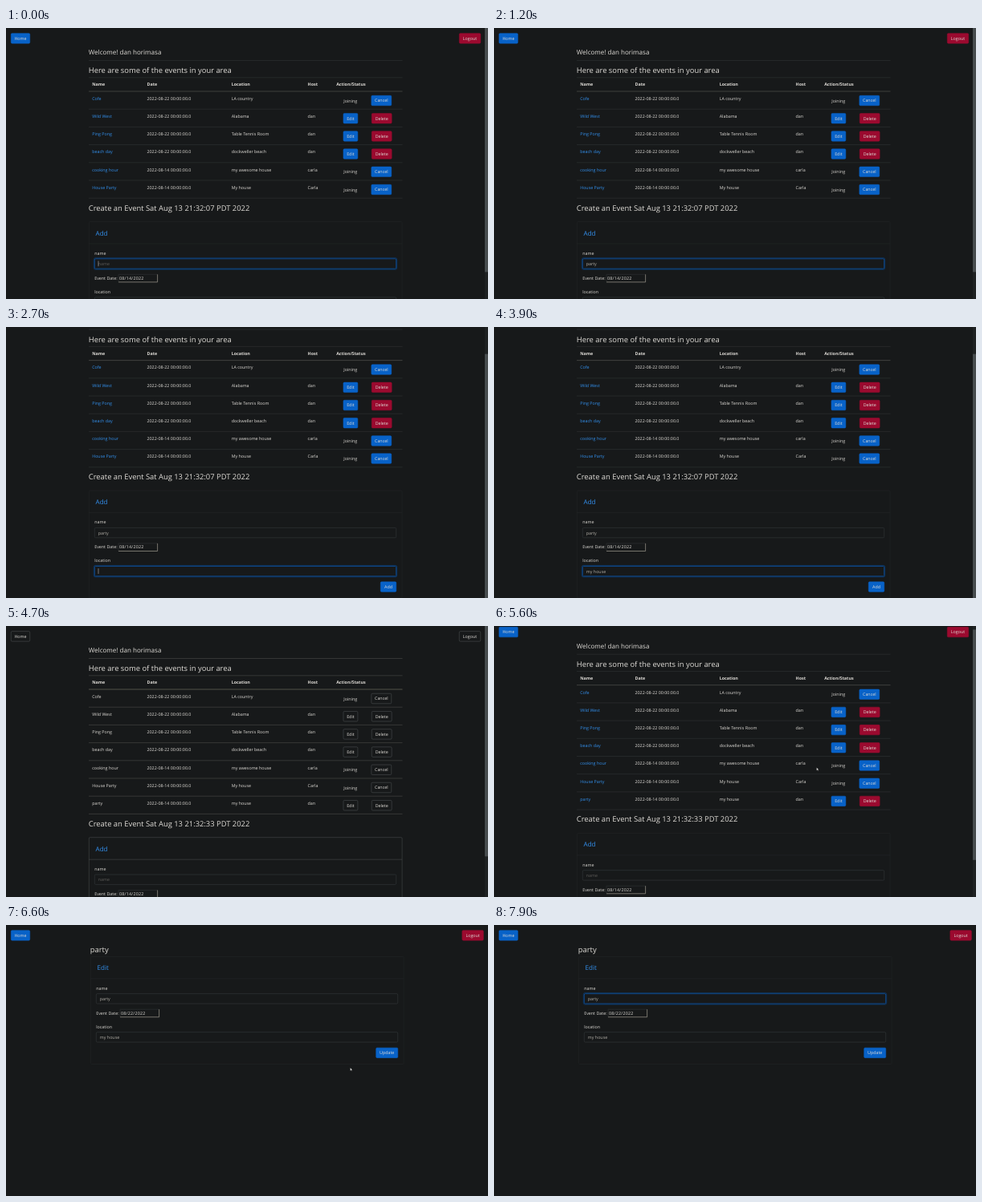
Recreate the animation shown at these times as an HTML page. Size 600x338 px, loop 8000 ms.

```html
<!DOCTYPE html>
<html lang="en">
<head>
<meta charset="utf-8">
<title>Events</title>
<style>
  html, body { margin: 0; width: 100%; height: 100%; overflow: hidden; background: #17191a; }
  svg {
    --raw: 0%;
    --bg: #17191a;
    --ink: #dedbd6;
    display: block; width: 600px; height: 338px; background: var(--bg);
    font: 5.35px "Open Sans", "Noto Sans", sans-serif;
    text-rendering: geometricPrecision;
  }
  text { fill: var(--ink); white-space: pre; }
  .h3 { font-size: 9.4px; font-weight: 500; }
  .h4 { font-size: 8.06px; font-weight: 500; }
  .th { font-weight: 700; }
  .mid { text-anchor: middle; }
  .title { fill: #3391ef; }
  .link { fill: color-mix(in srgb, var(--ink) var(--raw), #3391ef); }
  .value { fill: #b3afa8; }
  .hint { fill: #5d5c59; }
  .date { letter-spacing: .22px; }
  .rule { stroke: color-mix(in srgb, #4a4b48 var(--raw), #2f3335); stroke-width: .6; }
  .rule.head { stroke: color-mix(in srgb, #7b7868 var(--raw), #595a57); }
  .card, .cardline { fill: none; stroke: color-mix(in srgb, #45494b var(--raw), #222628); stroke-width: .6; }
  .input { fill: #17191a; stroke: #34393b; stroke-width: .6; }
  .focus .input { stroke: #0d56a8; stroke-width: .8; }
  .ring { fill: none; stroke: #0b3c73; stroke-width: 1; opacity: 0; }
  .focus .ring { opacity: .75; }
  .caret { stroke: #d5d2cc; stroke-width: .5; }
  .inset { fill: none; stroke: #a09b90; stroke-width: .7; }
  .inset.dim { stroke: #2b2f31; }
  .btn rect.face { stroke-width: .5; }
  .blue .face {
    fill: color-mix(in srgb, var(--bg) var(--raw), #0862c8);
    stroke: color-mix(in srgb, #55595a var(--raw), #0862c8);
  }
  .red .face {
    fill: color-mix(in srgb, var(--bg) var(--raw), #9b0a2f);
    stroke: color-mix(in srgb, #55595a var(--raw), #9b0a2f);
  }
  .btn.hover .face { fill: #0753a9; }
  .track { fill: #1e2122; }
  .thumb { fill: #474c4e; }
</style>
</head>
<body>
<svg id="stage" viewBox="0 0 600 338"></svg>
<script>
const NS = 'http://www.w3.org/2000/svg';
const LOOP = 8000, STEP = 100, VIEW = 338, ROW = 22.2, PAGE = 375.4;
const stage = document.getElementById('stage');

function el(parent, tag, attrs = {}, content = '') {
  const node = document.createElementNS(NS, tag);
  for (const key in attrs) node.setAttribute(key, attrs[key]);
  node.textContent = content;
  return parent.appendChild(node);
}
const group = (parent, cls = '') => el(parent, 'g', { class: cls });
const text = (parent, x, y, str, cls = '') => el(parent, 'text', { x, y, class: cls }, str);
const box = (parent, x, y, width, height, cls, rx = 1.3) =>
  el(parent, 'rect', { x, y, width, height, rx, class: cls });
const line = (parent, x1, y1, x2, y2, cls) => el(parent, 'line', { x1, y1, x2, y2, class: cls });
const show = (node, on) => node.style.display = on ? '' : 'none';
const shift = (node, x, y) => node.setAttribute('transform', `translate(${x} ${y})`);

function button(parent, x, y, w, label, color) {
  const g = group(parent, 'btn ' + color);
  box(g, x - .9, y - .9, w + 1.8, 14.8, 'ring', 2);
  box(g, x + .25, y + .25, w - .5, 12.5, 'face');
  text(g, x + w / 2, y + 8.4, label, 'mid');
  return g;
}

function field(parent, x, y, hint) {
  const g = group(parent);
  box(g, x - .7, y - .7, 377.4, 14.4, 'ring', 1.8);
  box(g, x + .3, y + .3, 375.4, 12.4, 'input');
  const value = text(g, x + 4.8, y + 8.5, '', 'value');
  const caret = line(g, x + 5, y + 3, x + 5, y + 9.8, 'caret');
  show(caret, false);
  return {
    set(str) {
      value.textContent = str || hint;
      value.setAttribute('class', str ? 'value' : 'hint');
    },
    focus: on => g.classList.toggle('focus', on),
    caret: on => show(caret, on)
  };
}

function card(parent, x, y, title, date, label, labelWidth) {
  box(parent, x + .3, y, 389.8, 134, 'card');
  line(parent, x, y + 27.5, x + 390, y + 27.5, 'cardline');
  text(parent, x + 8.6, y + 17, title, 'h4 title');
  text(parent, x + 7.2, y + 41.2, 'name');
  const name = field(parent, x + 7, y + 46, 'name');
  text(parent, x + 7.2, y + 72.4, 'Event Date:');
  el(parent, 'path', { d: `M${x + 37} ${y + 75.4}v-9.6h48.6`, class: 'inset dim' });
  el(parent, 'path', { d: `M${x + 37} ${y + 75.4}h48.6v-9.6`, class: 'inset' });
  text(parent, x + 38, y + 72.4, date, 'date');
  text(parent, x + 7.2, y + 89.4, 'location');
  const place = field(parent, x + 7, y + 94, '');
  const send = button(parent, x + 383 - labelWidth, y + 113.5, labelWidth, label, 'blue');
  return { name, place, send };
}

function nav(parent, right) {
  button(parent, 6, 6.4, 24, 'Home', 'blue');
  button(parent, right - 27, 6.4, 27, 'Logout', 'red');
}

// List page
const list = group(stage);
nav(list, 591);
text(list, 102.8, 33, 'Welcome! dan horimasa', 'h4');
line(list, 103, 40.5, 493.5, 40.5, 'rule');
text(list, 102.8, 56.3, 'Here are some of the events in your area', 'h3');
line(list, 103, 61.8, 493.5, 61.8, 'rule');
const columns = [107.2, 175.5, 280.7, 375.6, 411.2];
['Name', 'Date', 'Location', 'Host', 'Action/Status']
  .forEach((label, i) => text(list, columns[i], 72.3, label, 'th'));
line(list, 103, 79, 493.5, 79, 'rule head');

const events = [
  ['Cofe', 22, 'LA country', '', false],
  ['Wild West', 22, 'Alabama', 'dan', true],
  ['Ping Pong', 22, 'Table Tennis Room', 'dan', true],
  ['beach day', 22, 'dockweller beach', 'dan', true],
  ['cooking hour', 14, 'my awesome house', 'carla', false],
  ['House Party', 14, 'My house', 'Carla', false],
  ['party', 14, 'my house', 'dan', true]
];
let partyRow, partyEdit;
events.forEach(([name, day, place, host, mine], i) => {
  const g = partyRow = group(list);
  shift(g, 0, 79 + i * ROW);
  [name, `2022-08-${day} 00:00:00.0`, place, host]
    .forEach((str, c) => text(g, columns[c], 10.9, str, c ? '' : 'link'));
  if (mine) {
    partyEdit = button(g, 419.7, 5, 18.4, 'Edit', 'blue');
    button(g, 455, 5, 25.4, 'Delete', 'red');
  } else {
    text(g, 428.8, 13.5, 'Joining', 'mid');
    button(g, 454.6, 5, 25.4, 'Cancel', 'blue');
  }
  line(g, 103, ROW, 493.5, ROW, 'rule');
});

const create = group(list);
const heading = text(create, 102.8, 227.5, '', 'h3');
const add = card(create, 103, 241.5, 'Add', '08/14/2022', 'Add', 20);

// Edit page
const edit = group(stage);
nav(edit, 594.6);
text(edit, 104.8, 34.4, 'party', 'h3');
const update = card(edit, 105, 39.4, 'Edit', '08/22/2022', 'Update', 27.6);
update.name.set('party');
update.place.set('my house');

const bar = group(stage);
box(bar, 596, 0, 4, VIEW, 'track', 0);
const thumb = box(bar, 596, 0, 4, 300, 'thumb', 0);

const pointer = el(stage, 'path', {
  d: 'M0 0V3.7L.9 2.9 1.5 4.3 2.1 4 1.5 2.7H2.7Z',
  fill: '#f4f4f4', stroke: '#000', 'stroke-width': .25
});

// Timeline: [ms, value, ...]
const nameSteps = [[0, ''], [700, 'p'], [800, 'pa'], [900, 'par'], [1100, 'part'], [1200, 'party'], [4700, '']];
const placeSteps = [[0, ''], [3100, 'm'], [3300, 'my'], [3500, 'my '], [3700, 'my ho'],
  [3800, 'my hou'], [3900, 'my house'], [4700, '']];
const scrollKeys = [[1600, 0], [1700, 3], [1800, 9], [1900, 16.3], [2000, 24], [2100, 31], [2200, 35.5],
  [2300, 37.4], [4600, 37.4], [4700, 0], [5400, 0], [5500, 1.5], [5600, 5.3], [5700, 27], [5800, 47]];
const rawKeys = [[4600, 0], [4700, 100], [4900, 0], [6300, 0], [6400, 100], [6600, 0]];
const paths = [
  [[1700, 137, 282], [1900, 135, 268.5], [2200, 131, 288], [2500, 124, 303]],
  [[5200, 150, 292], [5400, 290, 222], [5600, 401.6, 176.5], [5800, 428.3, 196.5], [6000, 428.5, 178], [6700, 428.5, 178],
   [7000, 330, 120], [7200, 300, 97]]
];

const between = (t, from, to) => t >= from && t < to;
const held = (steps, t) => steps.filter(s => s[0] <= t).pop()[1];

function tween(keys, t, i = 1) {
  const n = keys.findIndex(k => k[0] > t);
  if (n === 0) return keys[0][i];
  if (n < 0) return keys[keys.length - 1][i];
  const a = keys[n - 1], b = keys[n];
  return a[i] + (b[i] - a[i]) * (t - a[0]) / (b[0] - a[0]);
}

function draw(t) {
  const saved = t >= 4700, editing = t >= 6400;
  const scroll = tween(scrollKeys, t);
  const page = PAGE + (saved ? ROW : 0);

  stage.style.setProperty('--raw', tween(rawKeys, t) + '%');
  show(list, !editing);
  show(bar, !editing);
  show(edit, editing);

  shift(list, 0, -scroll);
  show(partyRow, saved);
  shift(create, 0, saved ? ROW : 0);
  heading.textContent = `Create an Event Sat Aug 13 21:32:${saved ? 33 : '07'} PDT 2022`;
  thumb.setAttribute('y', scroll * VIEW / page);
  thumb.setAttribute('height', VIEW * VIEW / page);

  add.name.set(held(nameSteps, t));
  add.name.focus(t < 2700);
  add.name.caret(t < 400);
  add.place.set(held(placeSteps, t));
  add.place.focus(between(t, 2700, 4400));
  add.place.caret(between(t, 2700, 2900));
  add.send.classList.toggle('focus', between(t, 4400, 4700));
  add.send.classList.toggle('hover', between(t, 4500, 4700));
  partyEdit.classList.toggle('hover', between(t, 6000, 6400));
  partyEdit.classList.toggle('focus', between(t, 6200, 6400));
  update.name.focus(t >= 7300);

  const path = paths.find(p => between(t, p[0][0], p[p.length - 1][0]));
  show(pointer, path);
  if (path) shift(pointer, tween(path, t), tween(path, t, 2));
}

const start = performance.now();
function tick() {
  const t = (performance.now() - start) % LOOP;
  draw(Math.floor(t / STEP) * STEP);
  requestAnimationFrame(tick);
}
tick();
</script>
</body>
</html>
```
